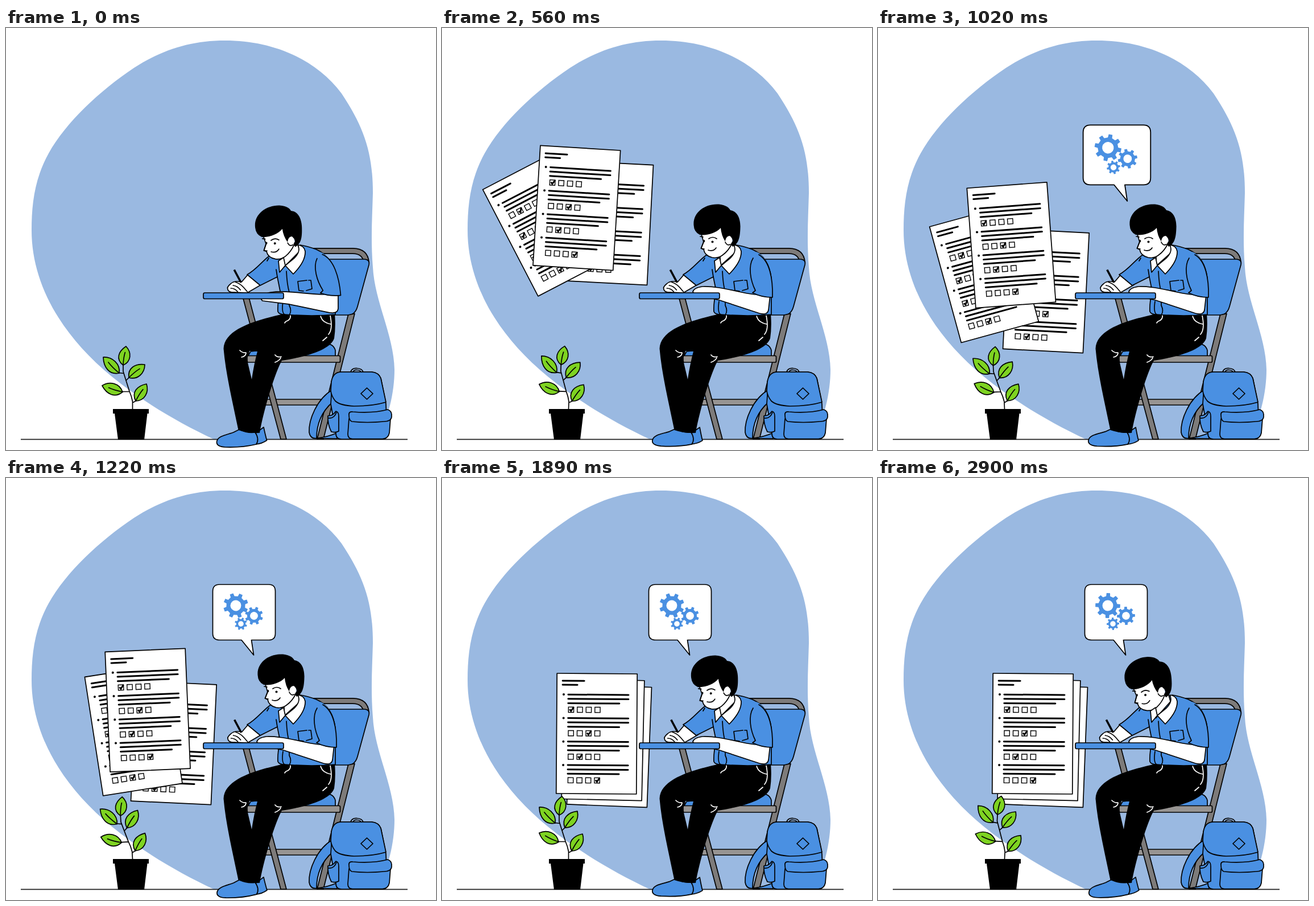
These frames come from a looping animation (756 px wide and 741 px high, 2.93 s). An HTML page:

```html
<!DOCTYPE html>
<html lang="en">
<head>
<meta charset="utf-8">
<title>Student at a desk</title>
<style>
html, body { margin: 0; width: 100%; height: 100%; overflow: hidden; background: #fff; }
svg { display: block; width: 756px; height: 741px; }
.ink { stroke: #000; stroke-width: 1.7; stroke-linejoin: round; stroke-linecap: round; fill: none; }
.blue { fill: #4a90e2; }
.white { fill: #fff; }
.grey { fill: #7d7b7a; }
.pale { fill: #979492; }
.green { fill: #7ed321; }
.chalk { stroke: #fff; stroke-width: 1.7; stroke-linecap: round; fill: none; }
</style>
</head>
<body>
<svg viewBox="0 0 756 741" xmlns="http://www.w3.org/2000/svg">
  <path fill="#9ab9e1" d="M365 722C305 694 240 656 186 612C98 540 45 450 45 355C45 310 50 265 75 220C105 166 165 110 225 70C275 38 325 22 385 22C470 22 545 55 590 115C630 175 645 220 645 290C644 330 641 370 645 420C648 480 682 540 683 600C683 640 672 690 650 722Z"/>
  <path d="M26 722.3H706" stroke="#222" stroke-width="1.8"/>

  <g id="sheets"></g>

  <g id="bubble">
    <path class="ink white" d="M375.500 187H462Q473.500 187 473.500 199V273Q473.500 284.500 462 284.500H431.500L435.500 311L414 284.500H375.500Q363.500 284.500 363.500 273V199Q363.500 187 375.500 187Z"/>
    <g id="gears" class="blue"></g>
  </g>

  <g id="plant">
    <path class="ink" d="M222.500 670V656Q221 647 217 638L206 603V591M199 605.500L207 606.500M217 613L211 619M205 638.500H217M228 655L222.500 658"/>
    <g id="leaves"></g>
  </g>
  <path d="M188 669H251V677H248.500L243 723H197L191 677H188Z"/>

  <g id="chair">
    <path d="M540 391.500H610Q632 392 633.500 412" fill="none" stroke="#000" stroke-width="11"/>
    <path d="M540 391.500H610Q632 392 633.500 412" fill="none" stroke="#7d7b7a" stroke-width="7.600"/>
    <path class="ink blue" d="M500 406H631Q640 407 638 416L618 489Q614 503 603 504H500Z"/>
    <path class="ink pale" d="M455 652H560V662H455Z"/>
    <path class="ink grey" d="M601.500 504L613 501.500L558 722H547ZM417 475H427.500L493 722H483Z"/>
    <path class="ink blue" d="M425 577L430 568L556 555Q575 552 579 566V577Z"/>
    <rect class="ink pale" x="424" y="575.500" width="163.500" height="11.500" rx="2"/>
  </g>

  <g id="backpack">
    <path class="ink blue" d="M574 635C546 652 532 688 533 710Q535 722 546 720.500C546 692 557 672 574 657Z"/>
    <path class="ink blue" d="M546 720.500Q566 718 582 711V721Z"/>
    <path class="ink" d="M606 604Q608 597 617 597.500Q626 598 628 604M610 604Q612 600 617 600.500Q623 601 624 604"/>
    <path class="ink blue" d="M574 616Q577 604 590 604H643Q655 605 659 615L668 660L670 714Q670 722 662 722H590Q580 722 580 712L571 660Z"/>
    <path class="ink blue" d="M572 621Q575 604 590 604H643Q655 605 659 615L668 657Q645 664 612 664Q588 663 579 655Q572 646 571 637Z"/>
    <path class="ink blue" d="M634.500 632L645 642L634.500 652L624 642Z"/>
    <path class="ink blue" d="M603 686L601 713Q601 721 609 721.500H662Q672 721 674 711L676 686Z"/>
    <path class="ink blue" d="M603 680Q602 673 610 674Q645 677 671 670Q679 672 678 683Q677 691 664 691Q635 694 608 691Q603 689 603 680Z"/>
    <path class="ink blue" d="M566 681Q575 681 580 673Q585 674 585 682V708Q579 711 572 709Q565 695 566 681Z"/>
    <path class="ink" d="M567 685Q577 686 581 675"/>
  </g>

  <g id="person">
    <g id="foot">
      <path class="ink blue" d="M438 712L453 701Q456 715 458.500 724Q450 730 439 731Z"/>
      <path class="ink blue" d="M370.500 727C371 716 390 714 400 710L410 705Q425 712 438 710Q446 722 440 731Q415 737 386 736Q370 735 370.500 727Z"/>
    </g>
    <path fill-rule="evenodd" d="M488 502C440 513 384 528 382.500 563C386 605 398 655 408.500 706Q426 712 446 711C453 670 474 602 485 584C530 577 570 565 577 545Q580 525 578 502ZM428 567Q427 575 423 579L432 617Q436 590 442 568Z"/>
    <path class="chalk" d="M411 566Q416 571 422 570M414 578Q421 577 422 571M473 574Q477 579 484 577M473 587Q481 584 483 579M500 504Q501 511 495 514Q491 515 490 518M553 505Q555 517 571 520M570 505Q575 529 567 538M564 543L557 549"/>

    <g id="writing">
      <path class="ink white" d="M427 432L415 446Q402 443 396 449Q388 455 391 460Q394 465 402 464L425 465L449 451Z"/>
      <path class="ink" d="M404 446Q413 449 419 456M400 452Q408 453 413 460M396 457Q403 457 408 463M419 456L425 463"/>
      <path d="M402 424.500L414 447" stroke="#000" stroke-width="3.600"/>
    </g>
    <path class="ink blue" d="M466 398C454 405 440 425 424 433L447 452L477 437L482 462Q477 484 478 498Q480 503 490 503Q540 507 579 503V440Q575 402 546 389Q530 383 517 381L480 402Z"/>
    <path class="ink" d="M477 437L475 424M459 409L462 404M493 427Q494 450 498 464V487Q503 497 498 504M490 503Q484 500 487 480"/>
    <path class="ink" d="M529 443L513 445L515 461L523 462M528 461L538 458L536 443H532"/>

    <g id="arm">
      <path class="ink white" d="M550 468C518 464 490 453 458 454Q443 456 441 463L443 467L488 478L558 501Q572 505 574 495L577 468Z"/>
      <path class="blue" d="M553 393C540 403 539 433 549 461L545 466Q562 474 581 473C582 440 576 404 553 393Z"/>
      <path class="ink" d="M547 404C538 418 542 443 551 461L546 465Q562 473 581 473C582 440 576 409 557 398"/>
    </g>
    <rect class="ink blue" x="347" y="465" width="141" height="10.500" rx="2.500"/>

    <g id="head">
      <path class="ink white" d="M489 398V418L518 392L515 374Z"/>
      <path class="ink white" d="M456 362L460 376L455.500 387L460 389Q462 400 475 403Q485 405 493 399Q503 392 509 380L508 350L470 345Z"/>
      <path d="M442.500 346C441 324 462 308 487 309.500C500 311 505 316 507 320C522 322 525 340 524.500 350C524 372 520 379 511 384Q507 380 511 374Q510 366 505 365Q499 366 498 375Q491 364 490 351C482 360 466 365 453 363Q443 358 442.500 346Z"/>
      <path class="white" d="M498 376Q499 366 505 366Q511 367 510 375Q508 381 502 381Z"/>
      <path class="ink" d="M498 376Q501 383 507 380M454 366L459 367M469 370Q476 365 483 370M468 390Q477 393 482 386M460 375L455.500 387L461 388"/>
      <circle cx="475.500" cy="375.500" r="2"/><ellipse cx="461" cy="374" rx="1.300" ry="2"/>
    </g>
    <path class="ink white" d="M488 403L479 409L481 429L491 417L505 432Q527 410 526 392Q524 382 513 381Q519 392 507 404L491 417Z"/>
  </g>
</svg>
<script>
const LOOP = 2930;
const SHEET_W = 141, SHEET_H = 211;
const byId = id => document.getElementById(id);
const make = (parent, tag, attrs = {}) => {
  const node = document.createElementNS('http://www.w3.org/2000/svg', tag);
  for (const name in attrs) node.setAttribute(name, attrs[name]);
  return parent.appendChild(node);
};
const place = (node, value) => node.setAttribute('transform', value);
const turn = (id, angle, x, y) => place(byId(id), `rotate(${angle} ${x} ${y})`);

// Progress from 0 to 1 between two times.
const ramp = (t, from, to) => Math.min(1, Math.max(0, (t - from) / (to - from)));
const ease = (t, from, to) => (1 - Math.cos(Math.PI * ramp(t, from, to))) / 2;
const easeOut = (t, from, to) => 1 - (1 - ramp(t, from, to)) ** 2;
const mix = (a, b, p) => a + (b - a) * p;
const wave = (t, period) => Math.cos(2 * Math.PI * t / period);

function drawSheet(ticks) {
  const node = make(byId('sheets'), 'g');
  make(node, 'rect', { class: 'ink white', x: -SHEET_W / 2, y: -SHEET_H / 2, width: SHEET_W, height: SHEET_H });
  const body = make(node, 'g', { transform: `translate(${-SHEET_W / 2} ${-SHEET_H / 2})` });
  let bars = 'M10 13H48M10 20H36';
  ticks.forEach((tick, row) => {
    const y = 37 + row * 41.3;
    bars += `M20 ${y}H126M20 ${y + 7.6}H126M20 ${y + 15.3}H110`;
    make(body, 'circle', { cx: 12, cy: y, r: 2 });
    for (let col = 0; col < 4; col++) {
      const x = 20.5 + col * 15.5;
      make(body, 'rect', { x, y: y + 22, width: 9.3, height: 9.3, fill: '#fff', stroke: '#000', 'stroke-width': 1.4 });
      if (col === tick) make(body, 'path', { d: `M${x + 2} ${y + 26}l2.500 3l4.800 -7`, fill: 'none', stroke: '#000', 'stroke-width': 2.8 });
    }
  });
  make(body, 'path', { d: bars, stroke: '#000', 'stroke-width': 3, 'stroke-linecap': 'round' });
  return node;
}

// Back to front; poses are centre x, centre y, angle.
const sheets = [
  { ticks: [1, 2, 3, 1], fanned: [295.6, 338.5, 3], landed: [295.5, 461, 3] },
  { ticks: [1, 0, 0, 2], fanned: [183, 342, -27.8], landed: [179, 430, -16.6] },
  { ticks: [0, 2, 1, 3], fanned: [237, 314, 3.8], landed: [231.5, 376, -4.6] }
].map((sheet, i, all) => {
  const depth = all.length - 1 - i;
  return { ...sheet, node: drawSheet(sheet.ticks), stacked: [272 + 11 * depth, 449 + 10.6 * depth, 0.4 + 0.9 * depth] };
});

function gearPath(radius) {
  const teeth = 8, root = radius * 0.76, hole = radius * 0.43;
  const corner = (turns, r) => `${r * Math.sin(turns * 2 * Math.PI)} ${-r * Math.cos(turns * 2 * Math.PI)}`;
  const points = [];
  for (let i = 0; i < teeth; i++) {
    points.push(
      corner((i - 0.27) / teeth, root), corner((i - 0.18) / teeth, radius),
      corner((i + 0.18) / teeth, radius), corner((i + 0.27) / teeth, root));
  }
  return `M${points.join('L')}ZM${-hole} 0a${hole} ${hole} 0 1 0 ${2 * hole} 0a${hole} ${hole} 0 1 0 ${-2 * hole} 0Z`;
}
const addGear = (x, y, radius, sense) => ({
  x, y, sense,
  node: make(byId('gears'), 'path', { d: gearPath(radius), 'fill-rule': 'evenodd' })
});
const gears = [addGear(404, 224, 22, 1), addGear(436, 242, 16, -1), addGear(413, 256, 11, -1)];

// A leaf grows from its base to its tip and swings around the base.
function addLeaf(x, y, tipX, tipY, swing = 0, period = 1) {
  const length = Math.hypot(tipX - x, tipY - y);
  const node = make(byId('leaves'), 'g');
  make(node, 'path', { class: 'ink green', d: `M0 0C${length * 0.25} -15 ${length * 0.68} -12 ${length} 0C${length * 0.72} 12 ${length * 0.25} 13 0 0Z` });
  make(node, 'path', { class: 'ink', d: `M0 0Q${length * 0.4} -1.500 ${length * 0.68} 0` });
  return { node, x, y, swing, period, heading: Math.atan2(tipY - y, tipX - x) * 180 / Math.PI };
}
const leaves = [
  addLeaf(206, 592, 211, 559),
  addLeaf(199, 606, 171, 578),
  addLeaf(216, 614, 244, 591, -16, 800),
  addLeaf(205, 639, 169, 628, 18, LOOP / 5),
  addLeaf(228, 655, 247, 625, 4, 630)
];

function draw(t) {
  const drop = ease(t, 520, 880), gather = ease(t, 900, 1600);
  byId('sheets').setAttribute('opacity', ease(t, 120, 420));
  for (const { node, fanned, landed, stacked } of sheets) {
    const [x, y, angle] = fanned.map((v, i) => mix(mix(v, landed[i], drop), stacked[i], gather));
    place(node, `translate(${x} ${y}) rotate(${angle})`);
  }

  const scale = 1.09 * easeOut(t, 690, 960) - 0.09 * ease(t, 960, 1220);
  byId('bubble').setAttribute('visibility', scale > 0 ? 'visible' : 'hidden');
  place(byId('bubble'), `translate(400 400) scale(${scale}) translate(-400 -400)`);
  for (const g of gears) place(g.node, `translate(${g.x} ${g.y}) rotate(${g.sense * (t - 850) * 0.067})`);

  const sway = 2.9 * ease(t, 0, 420) - 6.4 * ease(t, 420, 1220) + 3.5 * ease(t, 1220, 1890) + 3 * ease(t, 2370, 2900);
  turn('plant', sway, 222, 669);
  for (const l of leaves) {
    const swing = l.swing * (1 - wave(t, l.period)) / 2;
    place(l.node, `translate(${l.x} ${l.y}) rotate(${l.heading + swing})`);
  }

  const nod = 3.3 * (ease(t, 0, 500) - 1 - ease(t, 1300, 1890) - ease(t, 2370, 2900));
  turn('head', nod, 520, 425);
  turn('foot', 0.3 + 1.5 * wave(t - 560, 436), 445, 705);
  turn('arm', 6.5 * (easeOut(t, 0, 420) - 1), 553, 405);
  place(byId('writing'), `translate(${-0.8 * wave(t, LOOP / 10)} 0)`);
}

const start = performance.now();
function tick() {
  draw((performance.now() - start) % LOOP);
  requestAnimationFrame(tick);
}
tick();
</script>
</body>
</html>
```
